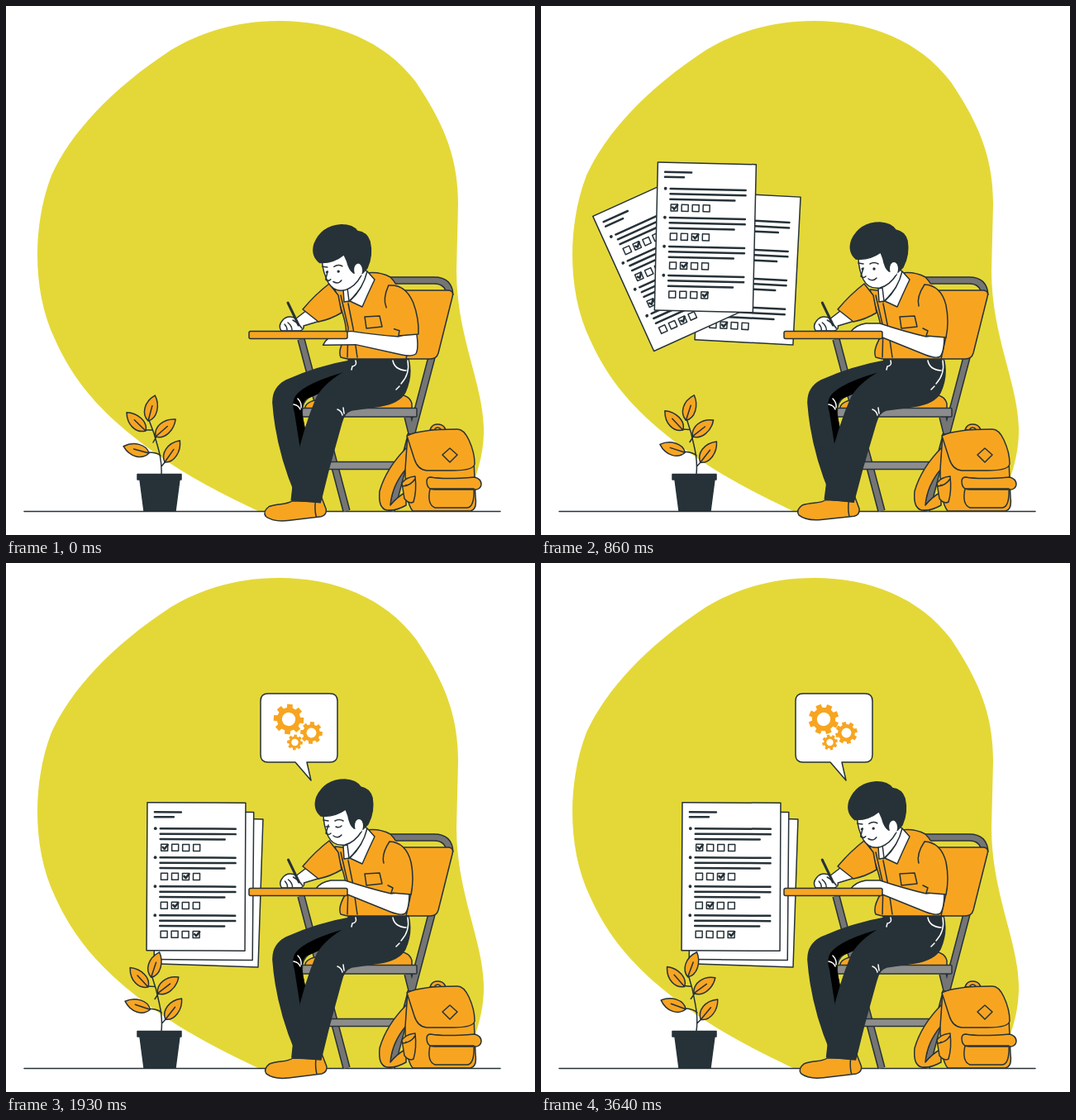
Animation, 640 px wide and 640 px high, one loop 3.71 s. Source, as an HTML page:

```html
<!DOCTYPE html>
<html lang="en">
<head>
<meta charset="utf-8">
<title>Student writing an exam</title>
<style>
  html, body { margin: 0; width: 100%; height: 100%; overflow: hidden; background: #fff; }
  svg { display: block; width: 100vw; height: 100vh; }
  .art { stroke: #263238; stroke-width: 1.5; stroke-linejoin: round; stroke-linecap: round; fill: none; }
  .o { fill: #f7a521; }
  .w { fill: #fff; }
  .d { fill: #263238; }
  .g { fill: #8c8c8c; }
  .bare { stroke: none; }
  .chalk { stroke: #fff; }
  .text { stroke-width: 2.5; }
  .tube { stroke-width: 9.5; stroke-linecap: butt; }
  .core { stroke: #757575; stroke-width: 6.5; }
</style>
</head>
<body>
<svg viewBox="0 0 640 640" xmlns="http://www.w3.org/2000/svg">
  <path fill="#e4d838" d="M38 300C38 268 44 233 55 205C78 154 128 100 200 53C240 29 285 18 330 18C398 18 458 42 496 92C530 143 547 183 547 240L545 320C545 400 578 458 578 513C578 540 572 565 552 611H305C264 591 231 575 198 553C124 503 86 462 60 405C44 372 38 336 38 300Z"/>
  <g class="art">
    <path d="M22 611.5H598"/>

    <defs><path id="frame" d="M357 403L412 611M486 497L514 609M515 425L466 611M455 332H518Q536 332 537 350"/></defs>
    <use href="#frame" class="tube"/>
    <use href="#frame" class="tube core"/>
    <path class="o" d="M462 344H536Q542 345 540 352L523 420Q521 427 513 427H462Z"/>
    <rect class="g" x="388" y="551.5" width="92" height="9"/>
    <path class="o" d="M362 489V485Q364 478 380 476L470 470Q488 469 491 481V489Z"/>
    <rect class="g" x="357" y="486.5" width="140" height="10.5" rx="1"/>

    <g id="papers"></g>

    <g id="plant">
      <path d="M188 567C189 546 183 532 179 517L173 501M177 513H168M178 528L182 521M187 544Q183 540 172 540M188 557L193 551"/>
    </g>
    <path class="d" d="M159 566.5H212V573H159ZM162 573H210L205 611H167Z"/>

    <g id="bubble">
      <path class="w" d="M317 158H392Q401 158 401 167V232Q401 241 392 241H364L369 263L350 241H317Q308 241 308 232V167Q308 158 317 158Z"/>
      <g id="gears" class="o bare"></g>
    </g>

    <path class="d" d="M422 428Q376 436 339 453Q322 462 323 481Q327 535 350 590L374 588L359 500Q356 480 366 474L425 442Z"/>
    <path class="bare" fill="#000" d="M420 440Q362 455 350 472Q345 479 349 492L358 549L366 530L359 497Q356 480 364 475Q400 462 420 444Z"/>
    <g id="leg">
      <path class="o" d="M347 599C341 604 330 602 319 606Q311 612 315 618Q324 625 342 623L382 618Q389 616 388 609L381 591L376 600ZM375 600Q374 610 376 618"/>
      <path class="d" d="M414 427H487Q492 447 483 467Q476 480 452 484L418 489Q409 492 406 505L391 560L381 601L346 598C350 548 362 508 376 474Q386 456 414 440Z"/>
    </g>
    <path class="chalk" d="M353 475Q358 480 357 486M348 482Q354 483 356 488M401 488Q406 490 407 495M408 486L409 493M468 429Q470 440 484 441M486 429Q489 445 478 457M476 460L472 464M423 429Q425 435 419 436L418 440"/>

    <path class="o" d="M398 343C404 364 414 386 411 400Q401 417 405 425L413 427H484L490 400Q482 344 465 328Q452 321 436 323L415 345Z"/>
    <path d="M405 350L414 389L413 425M414 360L420 390L425 425M434 376L452 375L455 388L436 390Z"/>

    <g id="writer">
      <path class="w" d="M364 368L351 378Q340 373 334 381Q329 387 333 393H356Q361 391 360 387L380 381Z"/>
      <path d="M341 359L354 386" stroke-width="3"/>
      <path d="M341 383Q346 387 346 392M347 380Q354 384 358 390M337 385Q340 388 340 392"/>
    </g>
    <path class="o" d="M391 336Q374 349 359 367L378 382Q393 379 406 371L402 350Z"/>

    <path class="w" d="M411 336L434 317L439 326Q426 348 414 358Z"/>
    <path class="w" d="M408 342L409 358L415 357L413 341ZM437 321L446 331Q437 350 431 364L416 357Q432 342 437 321Z"/>

    <g id="head">
      <path class="w" d="M384 304Q384 318 390 331Q396 343 410 341Q422 338 430 325L431 305L405 296Z"/>
      <path class="d" d="M381 306Q371 297 376 283Q386 262 410 262Q424 263 429 271Q440 273 443 284Q446 301 438 316L432 322L421 321Q416 317 414 306L411 298Q397 308 381 306Z"/>
      <ellipse class="w bare" cx="427" cy="318" rx="5" ry="8"/>
      <path d="M390 317L387 327Q390 330 393 327M396 330Q402 334 406 329M384 311L390 312M398 312Q403 309 408 312"/>
      <g id="eyes" class="d bare"><circle cx="389" cy="318" r="1.5"/><circle cx="403" cy="318" r="1.7"/></g>
      <path id="lids" d="M387 319H391M399 319Q403 321 406 318"/>
    </g>

    <g id="arm">
      <path class="w" d="M374 395Q380 386 393 384L410 384Q440 394 466 400L488 397Q488 418 483 424Q478 427 465 422L413 401Z"/>
      <path class="o bare" d="M466 335Q484 338 490 362Q494 382 490 401L466 399L468 393L462 390L467 388Q455 362 457 355Z"/>
      <path d="M464 337Q484 338 490 362Q494 382 490 401L466 399L468 393L462 390M464 337Q454 352 457 363"/>
    </g>
    <rect class="o" x="294" y="393.5" width="119" height="9" rx="2"/>

    <path class="o" d="M485 534Q460 559 452 587Q450 608 461 610Q472 611 484 604V588Q473 594 465 604Q467 580 484 560Z"/>
    <path class="o" d="M513 513Q515 506 522 506Q530 506 532 513H527Q522 507 518 513Z"/>
    <path class="o" d="M486 518L483 561Q483 600 492 611H562Q570 609 568 595L566 550L548 514Z"/>
    <path class="o" d="M485 520Q500 512 546 512Q554 512 560 525Q567 540 567 554Q566 562 540 562H509Q498 561 494 548ZM537 535L546 543L537 552L528 543Z"/>
    <path class="o" d="M513 584Q509 603 519 607H558Q567 606 566 584ZM514 570Q530 573 567 570Q575 572 575 579Q574 586 565 585H520Q509 586 509 575Q509 570 514 570Z"/>
    <path class="o" d="M479 577Q484 570 495 569Q497 587 493 600Q488 603 482 596ZM480 581Q490 580 495 572"/>
  </g>
</svg>
<script>
const LOOP = 3710;
const $ = id => document.getElementById(id);
const move = (el, transform) => el.setAttribute('transform', transform);
const progress = (t, from, to) => Math.max(0, Math.min(1, (t - from) / (to - from)));
const ease = (t, from, to) => (1 - Math.cos(Math.PI * progress(t, from, to))) / 2;
const wave = (t, period, start) => Math.sin(2 * Math.PI * (t - start) / period);
const backOut = (u, s) => 1 + (s + 1) * (u - 1) ** 3 + s * (u - 1) ** 2;

// Smooth path through values at the given times, at rest at both ends
function glide(times, values, t) {
  const last = times.length - 1;
  const i = Math.max(0, Math.min(last - 1, times.findLastIndex(time => time <= t)));
  const u = progress(t, times[i], times[i + 1]), span = times[i + 1] - times[i];
  const slope = j => j < 1 || j >= last ? 0 : (values[j + 1] - values[j - 1]) / (times[j + 1] - times[j - 1]);
  return values[i] + (values[i + 1] - values[i]) * u * u * (3 - 2 * u)
    + span * u * (1 - u) * (slope(i) * (1 - u) - slope(i + 1) * u);
}

// Leaves: base point and direction
for (const [x, y, angle] of [[172, 502, -75], [169, 514, -136], [181, 521, -41], [173, 541, -165], [192, 552, -55]]) {
  $('plant').innerHTML += `<path class="o" transform="translate(${x} ${y}) rotate(${angle})"
    d="M0 0C6 -10 21 -11 32 0C22 9 6 10 0 0H19"/>`;
}

function gearPath(r) {
  const hole = r * .44, points = [];
  for (let i = 0; i < 32; i++) {
    const outer = i % 4 === 1 || i % 4 === 2;
    const a = ((i >> 2) + (i % 4 - 1.5) * (outer ? .46 : .21)) * Math.PI / 4;
    points.push([Math.cos(a), Math.sin(a)].map(c => c * r * (outer ? 1 : .77)));
  }
  return `M${points.join('L')}ZM${hole} 0A${hole} ${hole} 0 1 0 ${-hole} 0A${hole} ${hole} 0 1 0 ${hole} 0Z`;
}

const gears = [[342, 189, 18.5], [369.5, 205.5, 13.5], [349.5, 217, 9.5]];
$('gears').innerHTML = gears.map(([, , r]) => `<path fill-rule="evenodd" d="${gearPath(r)}"/>`).join('');

// Papers, back to front: checked answers and poses (x, y, angle) at each beat
const beats = [600, 1140, 1430, 1940];
const papers = [
  { ticks: '2031', poses: [[250, 265, 2.9], [250, 397.5, 2.9], [249.5, 398, 2.5], [248.5, 397.5, 1.9]] },
  { ticks: '1002', poses: [[157, 276, -29.6], [154, 368.5, -15.5], [178.5, 384.5, -11], [239.5, 390.5, .5]] },
  { ticks: '0213', poses: [[202, 255, 5.8], [196, 322, -5.3], [206, 343.5, -4], [230, 379.5, .3]] }
];

function question(tick, i) {
  const y = 31.5 + i * 35;
  const boxes = [0, 1, 2, 3].map(k => `<rect x="${17 + k * 13}" y="${y + 19}" width="8" height="8"/>`);
  return `<circle class="d bare" cx="10" cy="${y}" r="1.9"/>${boxes.join('')}
    <path class="text" d="M16 ${y}H107M16 ${y + 6.4}H107M16 ${y + 12.8}H94M${19 + tick * 13} ${y + 22.5}l2 2.2l4 -5"/>`;
}

$('papers').innerHTML = papers.map(({ ticks }) =>
  `<g><g transform="translate(-59.5 -89.5)"><rect class="w" width="119" height="179"/>
    <path class="text" d="M9 11.5H41M9 17.5H32"/>${[...ticks].map(question).join('')}</g></g>`).join('');

function draw(t) {
  papers.forEach(({ poses }, i) => {
    const [x, y, angle] = [0, 1, 2].map(k => glide(beats, poses.map(pose => pose[k]), t));
    const sheet = $('papers').children[i];
    move(sheet, `translate(${x} ${y}) rotate(${angle})`);
    sheet.setAttribute('opacity', progress(t, 420 - i * 70, 570 - i * 70));
  });
  gears.forEach(([x, y], i) =>
    move($('gears').children[i], `translate(${x} ${y}) rotate(${(i ? -1 : 1) * (t - 1430) * .09 + 5})`));
  move($('bubble'), `translate(369 263) scale(${backOut(progress(t, 1010, 1410), 2.2)}) translate(-369 -263)`);

  move($('plant'), `rotate(${5 * wave(t, 1500, 265) * progress(t, 0, 600)} 188 566)`);
  move($('leg'), `rotate(${.65 + .65 * wave(t, 1600, 650)} 420 460)`);
  move($('arm'), `rotate(${-9.5 * (1 - ease(t, 0, 500))} 470 345)`);
  move($('writer'), `translate(${.8 * wave(t, 470, 0)} 0)`);
  const nod = 1 - ease(t, 0, 500) + ease(t, 2000, 2400);
  move($('head'), `translate(${nod * .5} ${nod * 2}) rotate(${nod * -3.5} 420 340)`);
  const blink = t >= 1860 && t < 2030;
  $('eyes').style.display = blink ? 'none' : '';
  $('lids').style.display = blink ? '' : 'none';
}

const start = performance.now();
function tick() {
  draw((performance.now() - start) % LOOP);
  requestAnimationFrame(tick);
}
tick();
</script>
</body>
</html>
```
